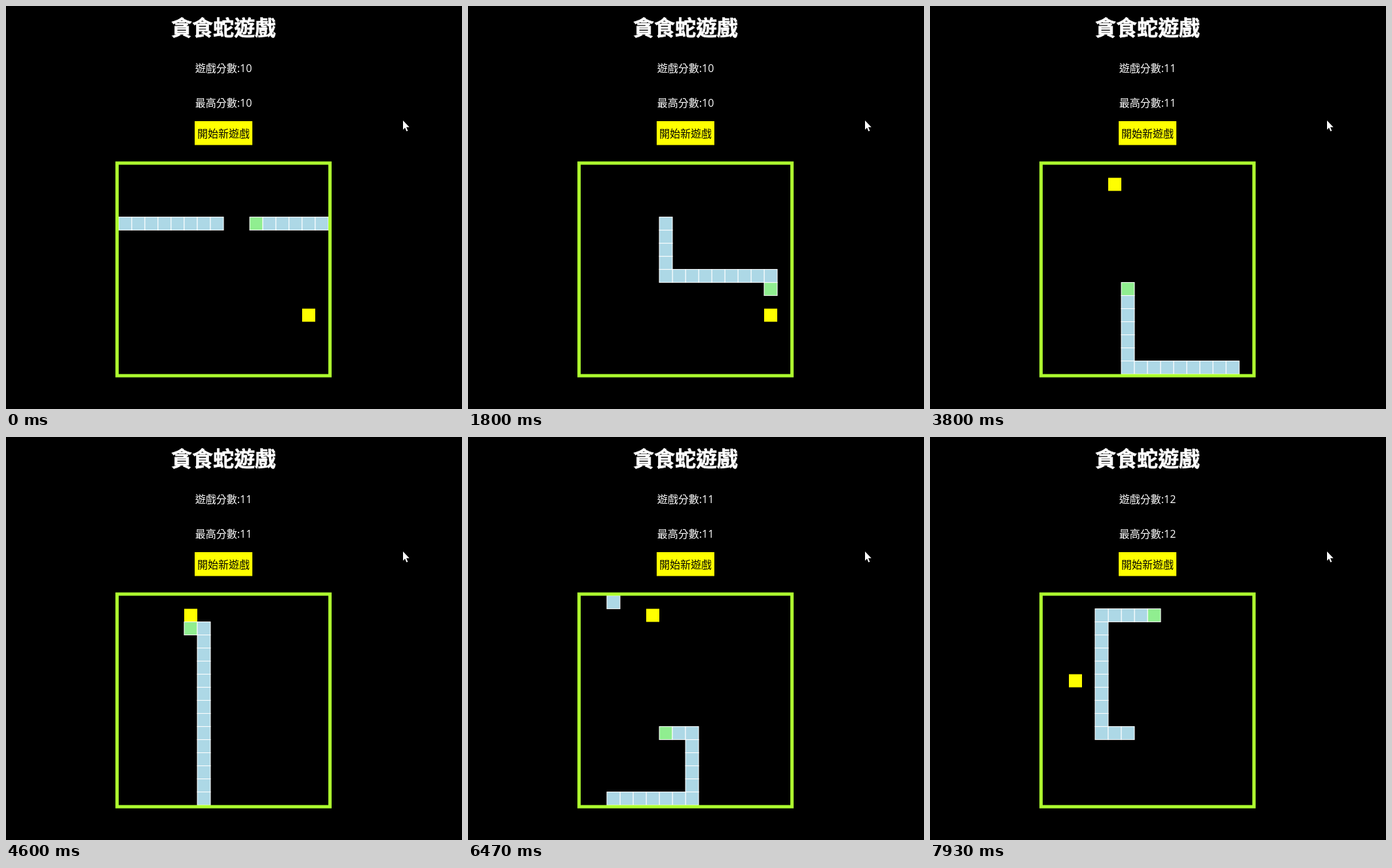
An HTML page with a canvas that plays this animation: 696 px wide and 616 px high, repeating every 8000 ms.

```html
<!DOCTYPE html>
<html lang="zh-Hant">
<head>
<meta charset="utf-8">
<title>貪食蛇遊戲</title>
<style>
  html, body { margin: 0; width: 100%; height: 100%; overflow: hidden; background: #000; }
  svg, canvas { position: absolute; left: 0; top: 0; }
  text { font: 16px "Open Sans", "Noto Sans CJK TC", "Noto Sans CJK", sans-serif; fill: #fff; text-anchor: middle; }
  .title { font-size: 32px; font-weight: bold; stroke: #fff; stroke-width: .6px; }
  .label { fill: #000; }
  canvas { left: 167px; top: 237px; }
</style>
</head>
<body>
<svg width="696" height="616">
  <text class="title" x="332" y="44.5">貪食蛇遊戲</text>
  <text id="score" x="332" y="101"></text>
  <text id="best" x="332" y="154"></text>
  <rect x="288" y="176" width="88" height="36.5" fill="#ff0"/>
  <text class="label" x="332" y="201">開始新遊戲</text>
  <path d="M606 175V189L609 186L611.3 191.5L613.3 190.7L611 185.3H615.7Z" fill="#fff"/>
</svg>
<canvas id="board" width="330" height="331"></canvas>
<script>
const LOOP = 8000, TICK = 100.2, CELL = 20, SIZE = 16, BORDER = 5, START_LENGTH = 14;
const ROUTE = 'L17 D4 R8 D7 L8 U13 L4 U3 R6 U5 L4 U9 R4';
const DIRECTIONS = { L: [-1, 0], R: [1, 0], U: [0, -1], D: [0, 1] };
const FOODS = [[14, 11], [5, 1], [2, 6]];
const MEALS = [19, 76]; // ticks at which the head reaches a food

const ctx = document.getElementById('board').getContext('2d');
const score = document.getElementById('score');
const best = document.getElementById('best');
ctx.translate(BORDER, BORDER + 0.6);

// Every cell the head visits, wrapping at the edges, from the initial tail onwards.
const trail = [[7, 4]];
for (const leg of ROUTE.split(' ')) {
  const [dx, dy] = DIRECTIONS[leg[0]];
  for (let i = 0; i < +leg.slice(1); i++) {
    const [x, y] = trail[trail.length - 1];
    trail.push([(x + dx + SIZE) % SIZE, (y + dy + SIZE) % SIZE]);
  }
}

function fillCell([x, y], color) {
  ctx.fillStyle = color;
  ctx.fillRect(x * CELL, y * CELL, CELL, CELL);
}

function strokeSquare(x, y, size, color, width) {
  ctx.strokeStyle = color;
  ctx.lineWidth = width;
  ctx.strokeRect(x, y, size, size);
}

function draw(tick) {
  const eaten = MEALS.filter(meal => tick >= meal).length;
  const length = START_LENGTH + MEALS.filter(meal => tick > meal).length;
  const head = tick + START_LENGTH - 1;

  score.textContent = '遊戲分數:' + (10 + eaten);
  best.textContent = '最高分數:' + (10 + eaten);

  ctx.clearRect(-10, -10, 350, 350);
  fillCell(FOODS[eaten], 'yellow');
  for (let i = 0; i < length; i++) {
    const [x, y] = trail[head - i];
    fillCell([x, y], i ? 'lightblue' : 'lightgreen');
    strokeSquare(x * CELL, y * CELL, CELL, 'white', 1);
  }
  strokeSquare(-BORDER / 2, -BORDER / 2, SIZE * CELL + BORDER, 'greenyellow', BORDER);
}

let lastTick = -1;
function frame() {
  const tick = Math.floor((performance.now() % LOOP) / TICK);
  if (tick !== lastTick) draw(lastTick = tick);
  requestAnimationFrame(frame);
}
frame();
</script>
</body>
</html>
```
